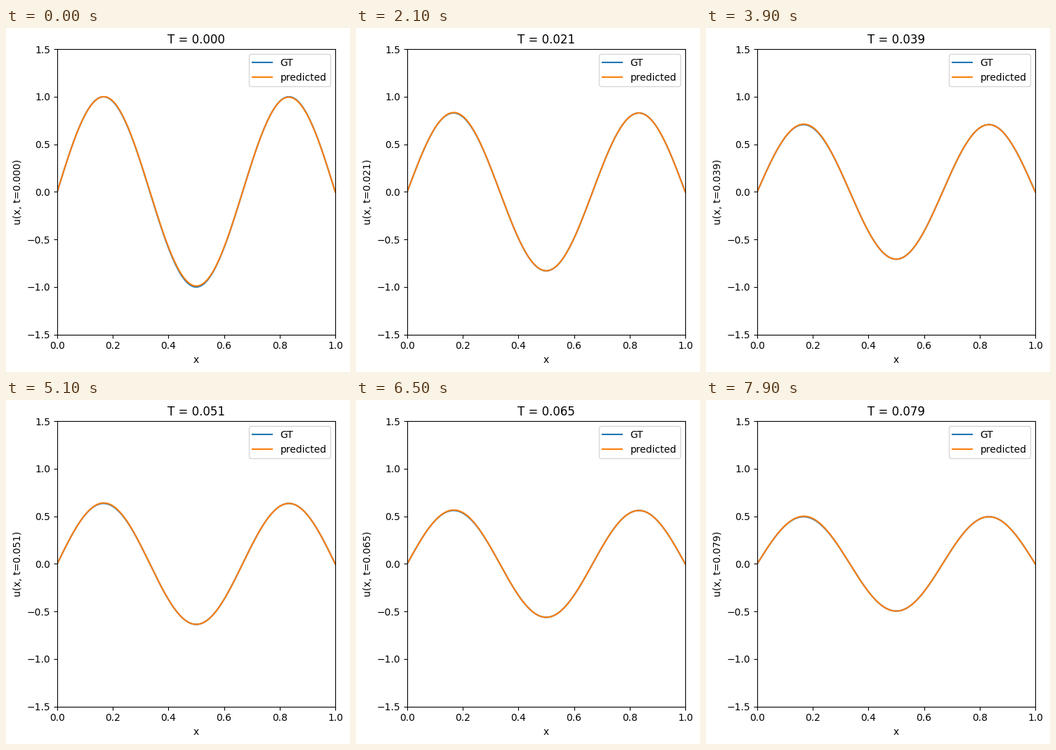
A matplotlib script for the animation above (8 s loop, 490x490 px).

```python
import numpy as np
import matplotlib.pyplot as plt
from matplotlib.animation import FuncAnimation

SIZE = 490
FRAMES = 80
DT = 0.001
ALPHA = 0.1

x = np.linspace(0, 1, 201)


def exact(t):
    """Heat equation solution for a sin(3 pi x) start."""
    return np.exp(-ALPHA * (3 * np.pi) ** 2 * t) * np.sin(3 * np.pi * x)


def bump(center, width):
    return np.exp(-((x - center) / width) ** 2)


def predicted(t):
    """Exact solution plus a small model error, largest at the start."""
    early = np.exp(-t / 0.01)
    error = 0.006 * bump(0.2, 0.08)
    error += early * (0.012 * bump(0.46, 0.13) - 0.005 * bump(0.15, 0.05)
                      - 0.005 * bump(0.86, 0.06))
    return exact(t) + error * np.minimum(1, 20 * x * (1 - x))


plt.rcParams["font.family"] = "DejaVu Sans"
fig, ax = plt.subplots(figsize=(SIZE / 100, SIZE / 100), dpi=100)
truth, = ax.plot(x, exact(0), label="GT")
guess, = ax.plot(x, predicted(0), label="predicted")
ax.set(xlim=(0, 1), ylim=(-1.5, 1.5), xlabel="x")
title = ax.set_title("T = 0.000")
ylabel = ax.set_ylabel("u(x, t=0.000)")
ax.legend(loc="upper right")
fig.tight_layout(pad=0.72)
fig.subplots_adjust(right=469 / SIZE, top=1 - 30.2 / SIZE)


def update(i):
    t = i * DT
    truth.set_ydata(exact(t))
    guess.set_ydata(predicted(t))
    title.set_text(f"T = {t:.3f}")
    ylabel.set_text(f"u(x, t={t:.3f})")
    return truth, guess, title, ylabel


anim = FuncAnimation(fig, update, frames=FRAMES, interval=100,
                     repeat=True, repeat_delay=0)
plt.show()
```
